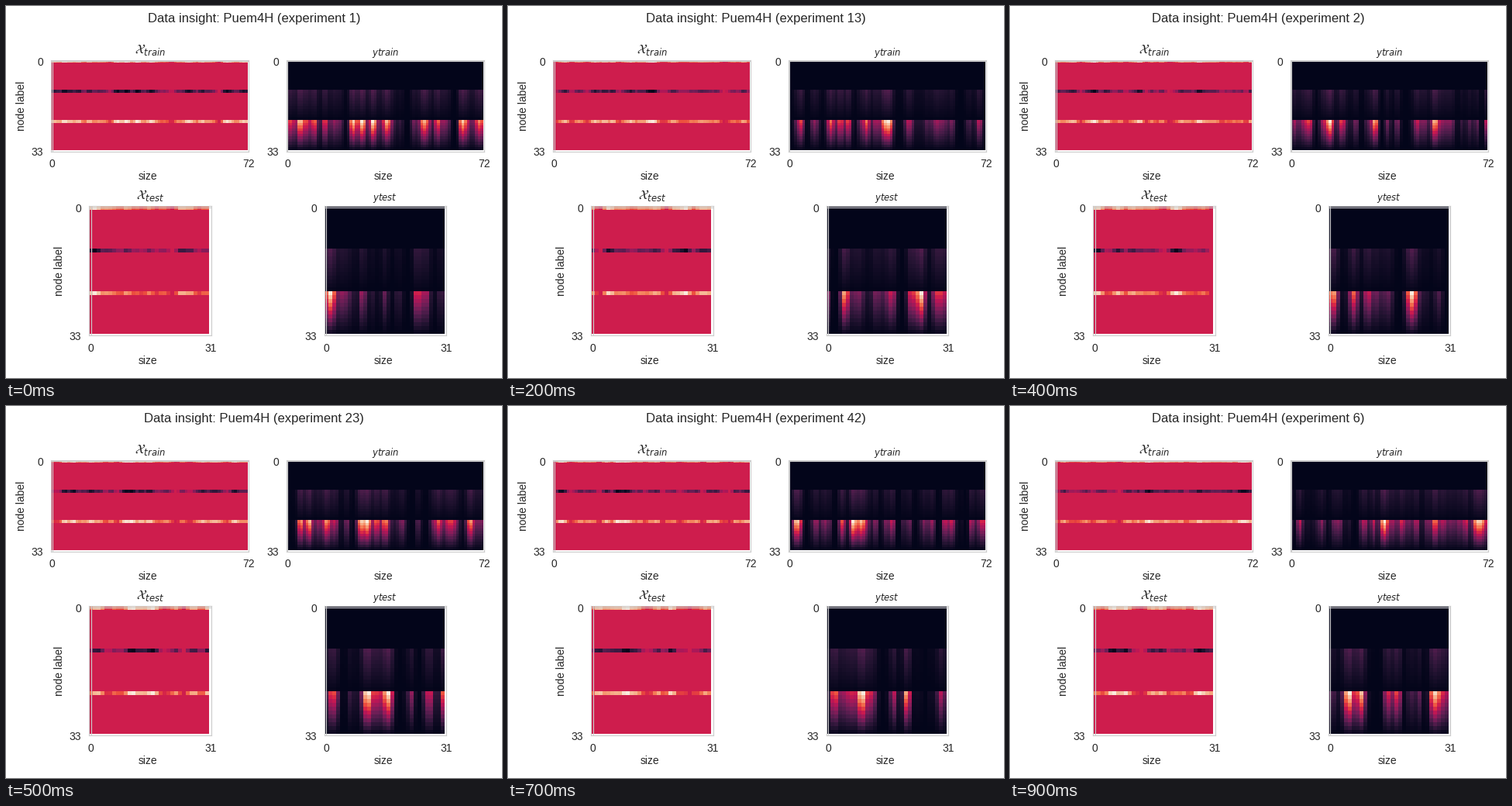
Animation, 640 px wide and 480 px high, one loop 1 s. Source, as a matplotlib script:

```python
import matplotlib.pyplot as plt
import numpy as np
from matplotlib.animation import FuncAnimation
from matplotlib.colors import LinearSegmentedColormap

W, H, DPI = 640, 480, 100
INK, LINE = "#262626", "#cccccc"
N_ROWS, N_TRAIN, N_TEST = 33, 72, 31
GROUP = N_ROWS // 3
EXPERIMENTS = (1, 11, 13, 17, 2, 23, 4, 42, 5, 6)

DARK = ["#03051a", "#221331", "#451c47", "#6a1f56", "#921c5b", "#b91657"]
LIGHT = ["#d92847", "#ed503e", "#f47d57", "#f6a47c", "#f7c9aa", "#faebdd"]
STOPS = np.linspace(0, 1, 12)
HEAT = LinearSegmentedColormap.from_list("heat", [
    *zip(STOPS[:6], DARK), (0.5, "#cb1b4f"), *zip(STOPS[6:], LIGHT)])

plt.rcParams.update({
    "font.family": "Liberation Sans", "font.size": 10, "text.color": INK,
    "xtick.color": INK, "ytick.color": INK, "axes.edgecolor": LINE,
    "axes.linewidth": 0.8, "grid.color": LINE, "grid.linewidth": 0.8,
    "mathtext.fontset": "dejavusans"})


def column_loads(rng, n):
    """Load per column in 0..1, slightly alike between neighbours."""
    noise = np.convolve(rng.random(n + 2), (0.5, 1, 0.5), mode="valid")
    return (noise - noise.min()) / np.ptp(noise)


def features(load):
    """Zero everywhere but the first row of each group of nodes."""
    grid = np.full((N_ROWS, len(load)), 0.51)
    grid[0] += 0.49 * load
    grid[GROUP] -= 0.51 * load
    grid[2 * GROUP] += 0.49 * load
    return grid


def response(load):
    """No response, a weak one and a strong one, each fading with depth."""
    grid = np.zeros((N_ROWS, len(load)))
    fade = 1 - np.arange(GROUP)[:, None] / GROUP
    grid[GROUP:2 * GROUP] = 0.21 * load ** 1.3 * fade
    grid[2 * GROUP:] = load ** 1.8 * fade ** 1.15
    return grid


fig = plt.figure(figsize=(W / DPI, H / DPI), dpi=DPI, facecolor="white")


def label(x, y, text, **kw):
    return fig.text(x / W, 1 - y / H, text, ha="center", va="center", **kw)


def panel(left, top, unit, n, title):
    w, h = (n + 0.5) * unit, (N_ROWS + 0.5) * unit
    ax = fig.add_axes([left / W, 1 - (top + h) / H, w / W, h / H])
    image = ax.imshow(np.zeros((N_ROWS, n)), cmap=HEAT, vmin=0, vmax=1, aspect="auto")
    ax.set(xlim=(-0.5, n), ylim=(N_ROWS, -0.5), xticks=(0, n), yticks=(0, N_ROWS))
    ax.tick_params(length=0, pad=7)
    ax.grid(True)
    ax.set_title(title, fontsize=12)
    return image


panels = []
for name, n, unit, top, x_left, y_left in (
        ("train", N_TRAIN, 3.52, 69.7, 57.9, 361.7),
        ("test", N_TEST, 5.0, 257.8, 107.0, 410.6)):
    panels.append((n,
                   panel(x_left, top, unit, n, rf"$\mathcal{{X}}_{{{name}}}$"),
                   panel(y_left, top, unit, n, rf"$_{{y{name}}}$")))

for y in (220, 458):
    label(183, y, "size")
    label(487, y, "size")
label(19.5, 129, "node label", rotation=90)
label(69, 342, "node label", rotation=90)
heading = label(320, 17, "", fontsize=12)


def update(index):
    experiment = EXPERIMENTS[index]
    heading.set_text(f"Data insight: Puem4H (experiment {experiment})")
    rng = np.random.default_rng(100 + experiment)
    for n, x_image, y_image in panels:
        load = column_loads(rng, n)
        x_image.set_data(features(load))
        y_image.set_data(response(load))
    return [heading]


anim = FuncAnimation(fig, update, frames=len(EXPERIMENTS), interval=100,
                     repeat=True, repeat_delay=0, blit=False)
plt.show()
```
